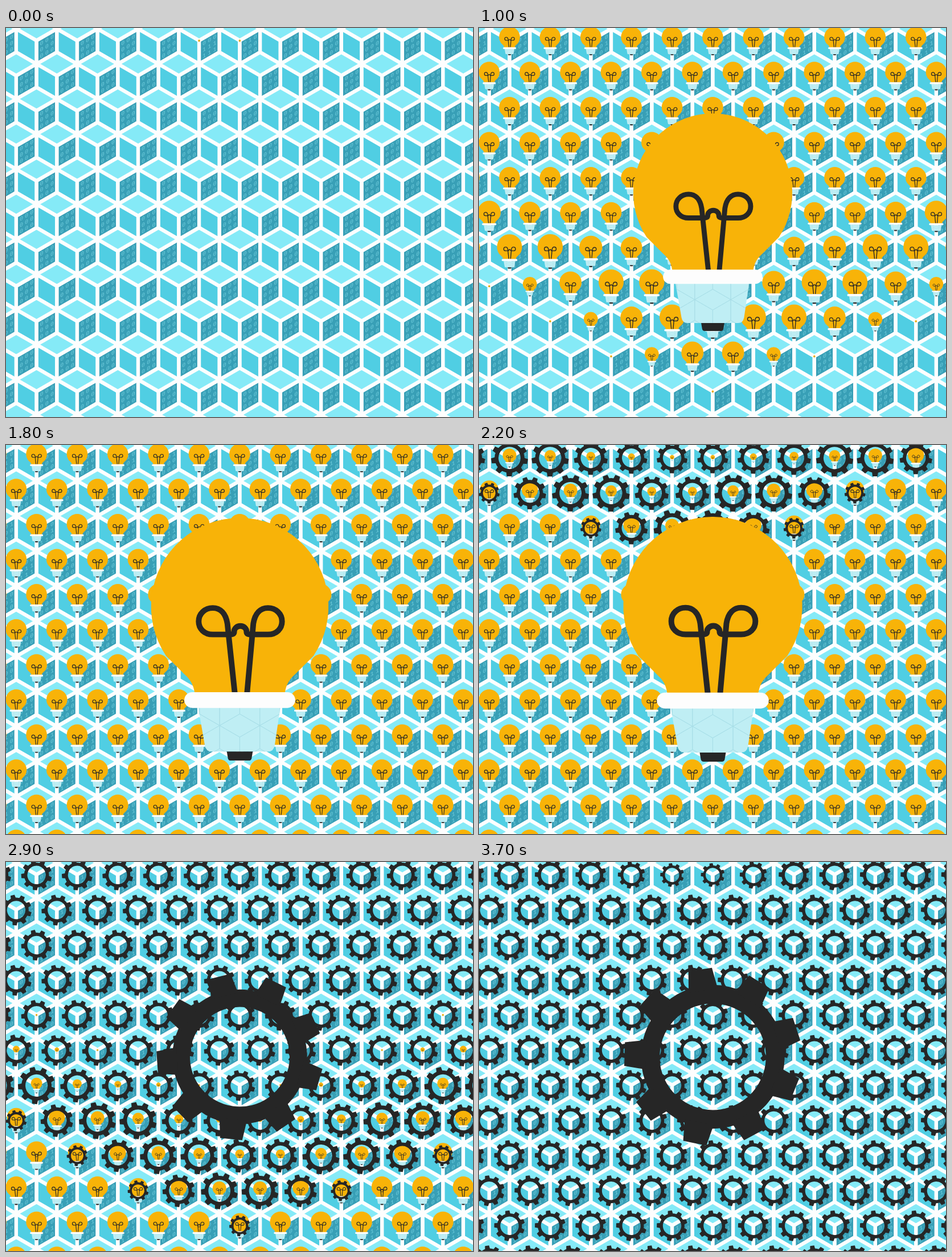
An HTML page with a canvas that plays this animation: 820 by 683 pixels, repeating every 3.8 s.

```html
<!DOCTYPE html>
<html lang="en">
<head>
<meta charset="utf-8">
<title>Bulbs and gears</title>
<style>
html, body { margin: 0; width: 100%; height: 100%; overflow: hidden; background: #fff; }
canvas { display: block; }
</style>
</head>
<body>
<canvas id="stage" width="820" height="683"></canvas>
<script>
const ctx = document.getElementById('stage').getContext('2d');
const STEPS = 38, STEP = 100;
const DX = 71.36, DY = 61.6, SIDE = 41.1, HALF = DX / 2;
const MID_X = 410.5, MID_Y = 341.5;
const SMALL = 18.3 / 157.5;          // grid icon size relative to the big one
const GEAR_DELAY = 18.5, END_DELAY = 36;
const DARK = '#262626', GOLD = '#f8b308';

// Sideways shift of the wave's centre in each row, in columns
const SHIFT = [-.5, -1, -.5, 0, 0, 0, 0, .5, .5, 0, 0, 0];
// Pop-in scale at every half step of age
const POP = [.1, .68, 1.06, 1.2, 1.21, 1.1, 1.03, 1];

const cells = [];
for (let row = -1; row < 12; row++)
  for (let k = -7; k <= 7; k++) {
    const col = k + (row & 1 ? .5 : 0);
    cells.push({
      row, x: 410.4 + col * DX, y: 22 + row * DY, seed: (row + 2) * 31 + k + 8,
      start: row < 0 ? 0 : row + .5 * Math.floor(Math.abs(col - SHIFT[row]))
    });
  }

const clamp = v => Math.max(0, Math.min(1, v));

function pop(age) {
  if (age < 0) return 0;
  const i = Math.min(age * 2, 6.999), n = Math.floor(i);
  return POP[n] + (POP[n + 1] - POP[n]) * (i - n);
}
const shrink = age => clamp(1 - age / 4.4);
const swell = age => age <= 0 ? 0 : 1.005 * (1 - Math.exp(-.93 * age ** .6));

function at(x, y, scale, draw) {
  if (scale <= 0) return;
  ctx.save();
  ctx.translate(x, y);
  ctx.scale(scale, scale);
  draw();
  ctx.restore();
}

// Cube faces around the cell's middle corner
const h = SIDE / 2;
const FACES = [
  ['#85eaf7', new Path2D(`M0 0L${-HALF} ${-h}L0 ${-SIDE}L${HALF} ${-h}Z`)],
  ['#50cee3', new Path2D(`M0 0L${-HALF} ${-h}V${h}L0 ${SIDE}Z`)],
  ['#389fb6', new Path2D(`M0 0L${HALF} ${-h}V${h}L0 ${SIDE}Z`)]
];

function digits(cell, step) {
  ctx.transform(1, -h / HALF, 0, 1, 0, 0);
  ctx.font = '10px "Liberation Mono", monospace';
  ctx.textAlign = 'center';
  ctx.textBaseline = 'middle';
  ctx.fillStyle = '#6fcddd';
  for (let i = 0; i < 9; i++) {
    const one = step >= cell.start && (cell.seed * 7 + i * i * 5) % 11 < 4;
    ctx.fillText(one ? '1' : '0', 9 + i % 3 * 9.2, 10 + Math.floor(i / 3) * 11);
  }
}

function cubes(step) {
  for (const c of cells) at(c.x, c.y, 1, () => {
    for (const [color, path] of FACES) {
      ctx.fillStyle = color;
      ctx.fill(path);
    }
  });
  ctx.strokeStyle = '#fdfefe';
  ctx.lineWidth = 6.2;
  for (const c of cells) at(c.x, c.y, 1, () => {
    for (const [, path] of FACES) ctx.stroke(path);
  });
  for (const c of cells) at(c.x, c.y, 1, () => digits(c, step));
}

const GLASS = new Path2D('M-80 96C-82 80-88 71-98 62L-131 29A157.5 157.5 0 1 1 131 29L98 62C88 71 82 80 80 96Z');
const BASE = new Path2D('M-74 120H72L62 188Q60 199 50 199H-50Q-60 199-62 188Z');
const CAP = new Path2D('M-23 199H23L21 211Q20 215 16 215H-16Q-20 215-21 211Z');
const BAND = new Path2D();
BAND.roundRect(-98.5, 93.5, 197, 28, 14);
const WIRE = new Path2D('M-10 94L-23-28C-26-47-36-56-49-56C-63-56-74-46-74-32C-74-19-64-9-49-9H-19' +
  'Q-11-9-11-14A11 10 0 0 1 11-14Q11-9 19-9H49C64-9 74-19 74-32C74-46 63-56 49-56C36-56 26-47 23-28L12 94');

// Faint cube outlines on the bulb's base
const ETCH = new Path2D();
for (const c of cells)
  if (c.row > 5 && c.row < 10 && Math.abs(c.x - MID_X) < 110)
    for (const [, path] of FACES)
      ETCH.addPath(path, new DOMMatrix().translate(c.x - MID_X, c.y - MID_Y));

function bulb() {
  const fill = (path, color) => { ctx.fillStyle = color; ctx.fill(path); };
  fill(GLASS, GOLD);
  fill(BASE, '#bfeef4');
  ctx.save();
  ctx.clip(BASE);
  ctx.strokeStyle = '#a9dfe8';
  ctx.lineWidth = 1;
  ctx.stroke(ETCH);
  ctx.restore();
  fill(CAP, DARK);
  ctx.translate(1, 0);
  ctx.strokeStyle = DARK;
  ctx.lineWidth = 10;
  ctx.stroke(WIRE);
  ctx.translate(-1, 0);
  fill(BAND, '#fdfdfd');
}

function gear(step) {
  ctx.rotate((-104 + (step - 29) * .72) * Math.PI / 180);
  ctx.fillStyle = ctx.strokeStyle = DARK;
  ctx.lineWidth = 33;
  ctx.beginPath();
  ctx.arc(0, 0, 110.5, 0, 7);
  ctx.stroke();
  for (let i = 0; i < 9; i++) {
    ctx.beginPath();
    ctx.moveTo(118, -26);
    ctx.lineTo(156, -21);
    ctx.lineTo(156, 21);
    ctx.lineTo(118, 26);
    ctx.fill();
    ctx.rotate(Math.PI * 2 / 9);
  }
}

function draw(step) {
  cubes(step);
  for (const c of cells) {
    if (c.row < 0) continue;
    const age = step - c.start, y = c.y + .8;
    at(c.x, y, SMALL * pop(age) * shrink(age - GEAR_DELAY), bulb);
    at(c.x, y, .172 * pop(age - GEAR_DELAY) * shrink(age - END_DELAY), () => gear(step));
  }
  at(MID_X, MID_Y, swell(step - 6) * shrink(step - 23), bulb);
  at(MID_X, MID_Y + .5, swell(step - 23.4), () => gear(step));
}

let shown = -1;
function tick() {
  const step = Math.floor(performance.now() / STEP) % STEPS;
  if (step !== shown) draw(shown = step);
  requestAnimationFrame(tick);
}
tick();
</script>
</body>
</html>
```
